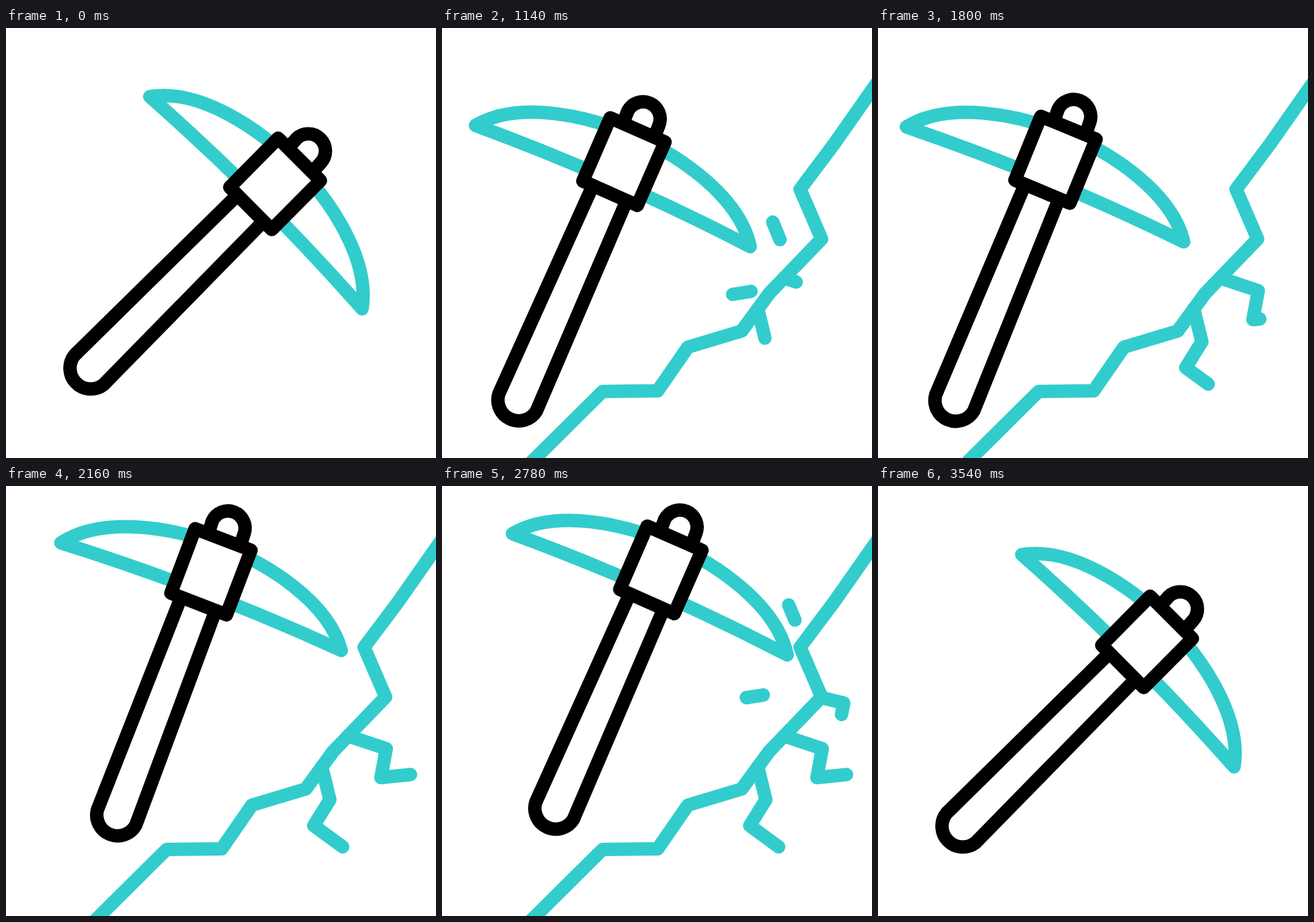
Recreate the animation shown at these times as an HTML page. Size 640 by 640 pixels, loop 3600 ms.

```html
<!DOCTYPE html>
<html lang="en">
<head>
<meta charset="utf-8">
<title>Pickaxe</title>
<style>
html, body { margin: 0; width: 100%; height: 100%; overflow: hidden; background: #fff; }
svg { display: block; width: 100vw; height: 100vh; }
path { fill: none; stroke: #3cc; stroke-width: 20; stroke-linecap: round; stroke-linejoin: round; }
.dark { fill: #fff; stroke: #000; }
</style>
</head>
<body>
<svg viewBox="0 0 640 640">
  <g id="lines"></g>
  <g id="pick">
    <path d="M214 102C288 90 378 150 429 203C482 254 542 344 530 418Q382 250 214 102Z"/>
    <path class="dark" d="M343 250L102 487A31 31 0 0 0 145 531L381 290"/>
    <path class="dark" d="M424 174L433 164A25.5 25.5 0 0 1 469 200L460 210"/>
    <path class="dark" d="M405 164L468 227L395.500 300L333 237Z"/>
  </g>
</svg>
<script>
const LOOP = 3600, REST = 45, RAISED = 21, HIT = 35;
const STRIKES = [890, 2210];   // start of each series of three blows
const PERIOD = 320, DOWN = 80;

const linear = u => u;
const smooth = u => u * u * (3 - 2 * u);
const easeOut = u => 1 - (1 - u) ** 2.3;

// Value at time t along [time, value] keys.
function at(t, keys, ease = linear) {
  if (t <= keys[0][0]) return keys[0][1];
  for (let i = 1; i < keys.length; i++) {
    const [t0, v0] = keys[i - 1], [t1, v1] = keys[i];
    if (t < t1) return v0 + (v1 - v0) * ease((t - t0) / (t1 - t0));
  }
  return keys.at(-1)[1];
}

function addLine(d) {
  const path = document.createElementNS("http://www.w3.org/2000/svg", "path");
  path.setAttribute("d", d);
  path.setAttribute("pathLength", 1);
  document.getElementById("lines").append(path);
  return path;
}

// Shows only the part of a line between the fractions a and b.
function trim(path, a, b) {
  path.style.display = b - a > 0.001 ? "" : "none";
  path.setAttribute("stroke-dasharray", `${Math.max(0, b - a)} 9`);
  path.setAttribute("stroke-dashoffset", -a);
}

const rock = addLine("M110 669L239 541L321 540L366 475L446 451L487 395L565 314L533 240L584 172L652 75");

const cracks = [
  { path: addLine("M509 372L566 391L558 434L602 429.500"),
    keys: [[900, 0], [1140, .128], [1440, .35], [1800, .77], [1920, 1]] },
  { path: addLine("M470 418L482 467L458 505.500L501 537"),
    keys: [[900, 0], [1140, .3], [1800, .92], [1910, 1]] },
  { path: addLine("M565 315L598 323L592 353L619 364"),
    keys: [[2210, 0], [2460, .24], [2520, .35], [3060, .76], [3100, .83], [3200, 1]] }
];

const sparks = [
  { path: addLine("M503 315L484 268.500"), start: STRIKES[0] },
  { path: addLine("M460 392L411 400"), start: STRIKES[0] },
  { path: addLine("M528 206L516 177"), start: STRIKES[1] },
  { path: addLine("M485.500 310L453 315"), start: STRIKES[1] }
];
const sparkHead = [[0, 0], [250, .56], [450, 1]];
const sparkTail = [[450, 0], [890, .81], [908, 1]];

const angleKeys = [[200, REST], [545, RAISED]];
for (const start of STRIKES) {
  for (let i = 0; i < 3; i++) {
    const t = start + i * PERIOD;
    angleKeys.push([t, RAISED], [t + DOWN, HIT]);
  }
  angleKeys.push([start + 3 * PERIOD, RAISED]);
}
angleKeys.push([3190, RAISED], [3540, REST]);

const pivotX = [[200, 177], [545, 143], [1980, 143], [2210, 198], [3090, 198], [3440, 177]];
const pivotY = [[200, 455], [545, 487.5], [1980, 487.5], [2210, 413.5], [3090, 413.5], [3440, 455]];
const pick = document.getElementById("pick");

function draw(now) {
  const t = now % LOOP;
  trim(rock, at(t, [[3050, 0], [3530, 1]], smooth), at(t, [[200, 0], [720, 1]], easeOut));
  const gone = at(t, [[3120, 0], [3520, 1]], smooth);
  for (const { path, keys } of cracks) trim(path, gone, at(t, keys));
  for (const { path, start } of sparks) trim(path, at(t - start, sparkTail), at(t - start, sparkHead));

  const x = at(t, pivotX, smooth), y = at(t, pivotY, smooth);
  const turn = at(t, angleKeys, smooth) - REST;
  pick.setAttribute("transform", `translate(${x} ${y}) rotate(${turn}) translate(-177 -455)`);
  requestAnimationFrame(() => draw(performance.now()));
}
draw(0);
</script>
</body>
</html>
```
